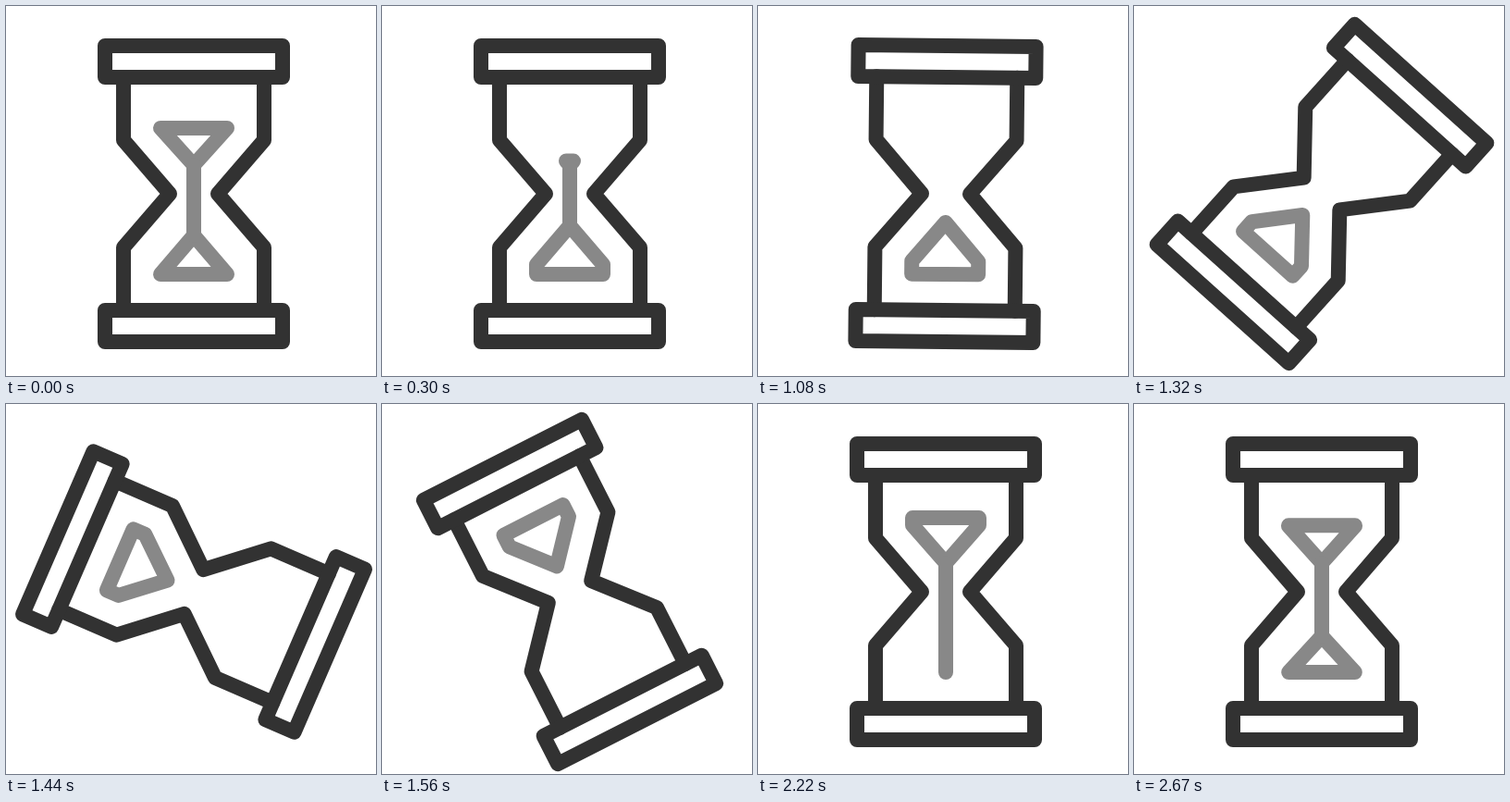
Recreate the animation shown at these times as an HTML page. Size 400 px wide and 400 px high, loop 2700 ms.

```html
<!DOCTYPE html>
<html lang="en">
<head>
<meta charset="utf-8">
<title>Hourglass</title>
<style>
  html, body { margin: 0; width: 100%; height: 100%; overflow: hidden; background: #fff; }
  svg { display: block; width: 100%; height: 100%; }
  path { fill: none; stroke-width: 16; stroke-linejoin: round; stroke-linecap: round; }
  .glass { stroke: #323232; }
  .sand { stroke: #888; }
</style>
</head>
<body>
<svg viewBox="0 0 400 400">
  <g id="hourglass">
    <path class="sand" id="upper"/>
    <path class="sand" id="lower"/>
    <path class="sand" id="stream"/>
    <path class="glass" d="M127 77V145L177 203L127 261V329M279 77V145L229 203L279 261V329"/>
    <path class="glass" d="M107 43H299V77H107ZM107 329H299V363H107Z"/>
  </g>
</svg>
<script>
  const LOOP = 2700, FRAMES = 75, CENTER = 203;
  const NECK = 172, FLOOR = 290, HALF = 36;
  const byId = id => document.getElementById(id);
  const [hourglass, upper, lower, stream] =
    ['hourglass', 'upper', 'lower', 'stream'].map(byId);

  const span = (f, from, to) => Math.min(1, Math.max(0, (f - from) / (to - from)));

  // cubic-bezier(.5, 0, .4, 1)
  function ease(x) {
    let low = 0, high = 1;
    for (let i = 0; i < 24; i++) {
      const s = (low + high) / 2, r = 1 - s;
      if (1.5 * r * r * s + 1.2 * r * s * s + s ** 3 < x) low = s; else high = s;
    }
    return low * low * (3 - 2 * low);
  }

  // A heap with a flat base, straight shoulders and a pointed apex.
  const heap = (half, base, shoulder, apex) =>
    `M${CENTER - half} ${base}H${CENTER + half}V${shoulder}` +
    `L${CENTER} ${apex}L${CENTER - half} ${shoulder}Z`;
  const line = (from, to) => `M${CENTER} ${from}V${to}`;

  function upperSand(f, flipped) {
    if (flipped) {
      const sunk = span(f, 50, 75);
      return heap(HALF, 116 + 16 * sunk, 130 + 2 * sunk, NECK);
    }
    const depth = 40 * (1 - span(f, 0, 9));
    return depth ? heap(depth * 0.9, NECK - depth, NECK - depth, NECK) : '';
  }

  function lowerSand(f, flipped) {
    if (flipped) {
      const p = span(f, 61, 75), apex = FLOOR - 42 * p;
      const half = HALF * (1 - (1 - p) ** 2);
      return { apex, d: p ? heap(half, FLOOR, FLOOR, apex) : '' };
    }
    const rise = 14 * span(f, 0, 10.7), apex = 248 - rise;
    return { apex, d: heap(HALF, FLOOR, FLOOR - rise, apex) };
  }

  function streamSand(f, flipped, apex) {
    if (flipped) {
      const fallen = span(f, 48, 61) ** 1.23;
      return fallen ? line(NECK, Math.min(apex, NECK + 118 * fallen)) : '';
    }
    const top = NECK + 62 * span(f, 8.5, 18.8);
    return top < apex ? line(top, apex) : '';
  }

  function draw(time) {
    // 75 poses per loop, held on a 30 ms clock
    const f = Math.floor(Math.floor((time % LOOP) / 30) * FRAMES / 90);
    const flipped = f >= 40;
    const angle = 180 * ease(span(f, 29, 50)) - (flipped ? 180 : 0);
    const pile = lowerSand(f, flipped);
    hourglass.setAttribute('transform', `rotate(${angle} ${CENTER} ${CENTER})`);
    upper.setAttribute('d', upperSand(f, flipped));
    lower.setAttribute('d', pile.d);
    stream.setAttribute('d', streamSand(f, flipped, pile.apex));
  }

  const start = performance.now();
  function tick() {
    draw(performance.now() - start);
    requestAnimationFrame(tick);
  }
  tick();
</script>
</body>
</html>
```
